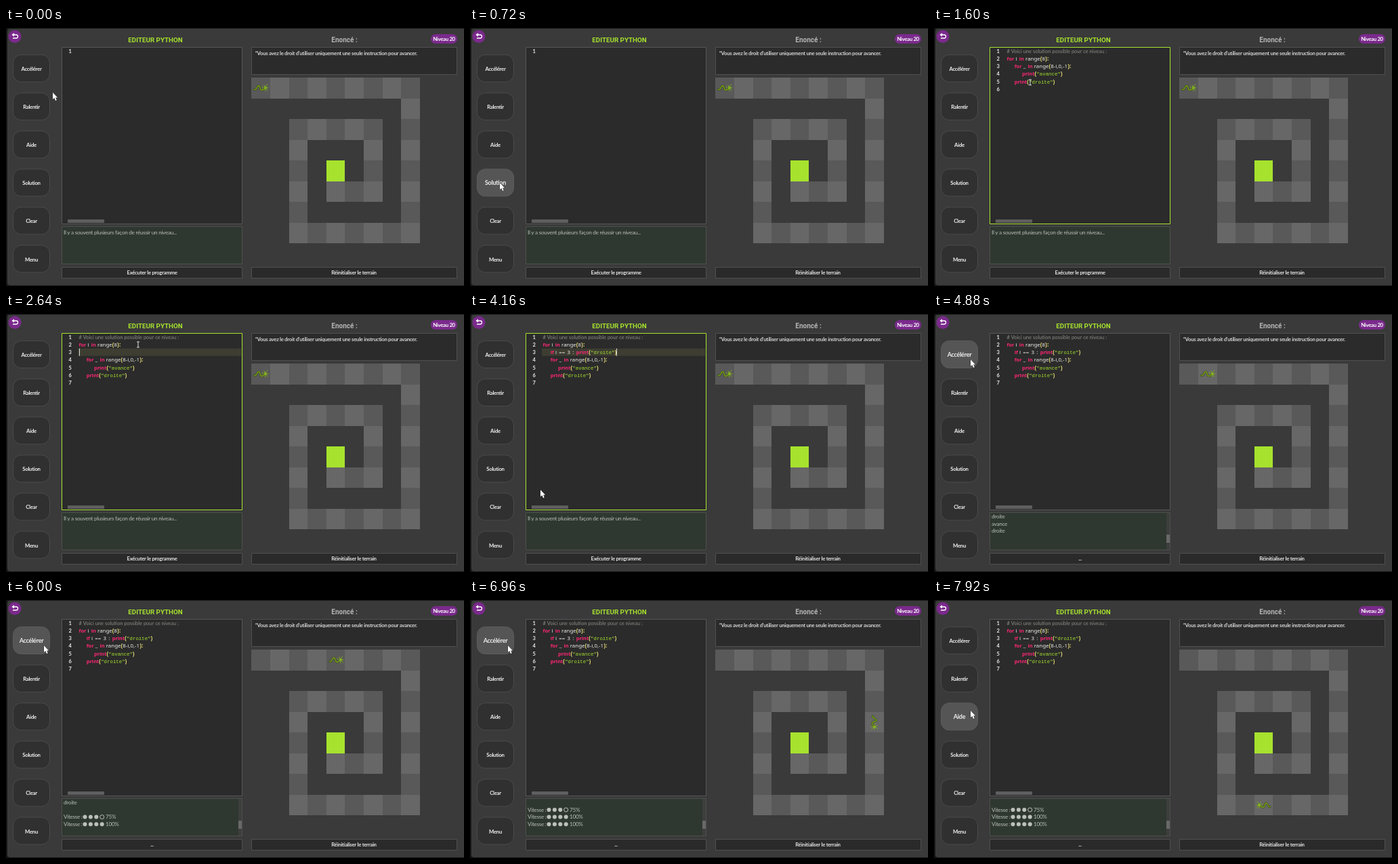
An HTML page with a canvas for the animation above (8 s loop, 676 by 380 pixels).

```html
<!DOCTYPE html>
<html lang="fr">
<meta charset="utf-8">
<title>Editeur Python</title>
<style>
html, body { margin: 0; height: 100%; overflow: hidden; background: #101010 }
canvas { display: block }
</style>
<canvas width="676" height="380"></canvas>
<script>
const ctx = document.querySelector('canvas').getContext('2d');
const LOOP = 8000, TICK = 80;
const GREEN = '#a6e22e', PURPLE = '#7a2a8c';
const UI = 'Lato, sans-serif', CODE = '"Noto Sans", sans-serif';

const STYLES = {
  comment: [`7.5px ${UI}`, '#8c8c86'],
  key: [`bold 7.5px ${CODE}`, '#f92672'],
  plain: [`7.9px ${CODE}`, '#eeeeea'],
  paren: [`bold 8.3px ${CODE}`, '#e6db74'],
  string: ['7.4px "Liberation Mono", monospace', GREEN],
};
const INDENT = 11.2;
const print = word => [['print', 'key'], ['(', 'paren'], [`"${word}"`, 'string'], [')', 'paren']];
const SOLUTION = [
  [0, [['# Voici une solution possible pour ce niveau :', 'comment']]],
  [0, [['for', 'key'], [' i ', 'plain'], ['in', 'key'], [' range', 'plain'], ['(', 'paren'], ['8', 'plain'], ['):', 'paren']]],
  [1, [['for', 'key'], [' _ ', 'plain'], ['in', 'key'], [' range', 'plain'], ['(', 'paren'], ['8-i,0,-1', 'plain'], ['):', 'paren']]],
  [2, print('avance')],
  [1, print('droite')],
  [0, []],
];
const TYPED = [['if', 'key'], [' i == 3 : ', 'plain'], ...print('droite')];
const OUTPUT = ['droite', 'avance', 'droite', '', 3, 4, 4];
const BUTTONS = ['Accélérer', 'Ralentir', 'Aide', 'Solution', 'Clear', 'Menu'];

// time, x, y, hovered button
const POINTER = [
  [0, 69, 95], [160, 69, 95], [560, 44, 228, 3], [1040, 44, 228], [1600, 142, 80],
  [1840, 142, 80], [2080, 195, 45], [3440, 195, 45], [3760, 125, 290], [4160, 104, 259],
  [4400, 150, 361], [4560, 150, 361], [4880, 54, 67, 0], [5200, 56, 67, 0],
  [7600, 56, 67, 0], [7760, 55, 84], [7840, 54, 115], [7920, 54, 163, 2], [8000, 54, 163, 2],
];

const cellX = c => Math.round(362.3 + c * 27.62);
const cellY = r => Math.round(73 + r * 30.56);

// walks along [dx, dy, steps] legs
const trail = [[0, 0]];
for (const [dx, dy, n] of [[1, 0, 8], [0, 1, 7], [-1, 0, 6], [0, -1, 5], [1, 0, 4], [0, 1, 3], [-1, 0, 2]])
  for (let i = 0; i < n; i++) {
    const [c, r] = trail.at(-1);
    trail.push([c + dx, r + dy]);
  }

function text(str, x, y, font, color, align = 'left') {
  ctx.font = font;
  ctx.fillStyle = color;
  ctx.textAlign = align;
  ctx.fillText(str, x, y);
  return ctx.measureText(str).width;
}

// tightly set interface text
function label(str, x, y, color, align = 'left', font = 'bold 7.8px') {
  ctx.letterSpacing = '-0.3px';
  text(str, x, y, `${font} ${UI}`, color, align);
  ctx.letterSpacing = '0px';
}

function box(x, y, w, h, fill, stroke, r = 0) {
  ctx.beginPath();
  ctx.roundRect(x, y, w, h, r);
  ctx.fillStyle = fill;
  ctx.fill();
  if (!stroke) return;
  ctx.strokeStyle = stroke;
  ctx.lineWidth = 1;
  ctx.stroke();
}

function disc(x, y, r, color, filled = true) {
  ctx.beginPath();
  ctx.arc(x, y, r, 0, 7);
  ctx.fillStyle = ctx.strokeStyle = color;
  ctx.lineWidth = 1;
  filled ? ctx.fill() : ctx.stroke();
}

function stroke(path, color, width) {
  ctx.strokeStyle = color;
  ctx.lineWidth = width;
  ctx.stroke(new Path2D(path));
}

function pointerAt(t) {
  const i = POINTER.findLastIndex(p => p[0] <= t);
  const [t0, x0, y0, hover] = POINTER[i], [t1, x1, y1] = POINTER[i + 1];
  const k = (t - t0) / (t1 - t0);
  return { x: x0 + (x1 - x0) * k, y: y0 + (y1 - y0) * k, hover };
}

function drawPointer({ x, y }) {
  ctx.save();
  ctx.translate(x, y);
  if (x > 105 && y < 106 && x < 348) {
    stroke('M-2-4H2M0-4V4M-2 4H2', '#ddd', 1);
  } else {
    const arrow = new Path2D('M0 0V10L2.4 8L4 12L5.8 11.2L4.2 7.4H7.2Z');
    ctx.strokeStyle = '#222';
    ctx.lineWidth = 1;
    ctx.stroke(arrow);
    ctx.fillStyle = '#fff';
    ctx.fill(arrow);
  }
  ctx.restore();
}

function drawRuns(runs, x, y, count = Infinity) {
  for (const [str, style] of runs) {
    const part = str.slice(0, Math.max(0, count));
    ctx.wordSpacing = style === 'plain' ? '1.2px' : '0px';
    x += text(part, x, y, ...STYLES[style]);
    count -= str.length;
  }
  ctx.wordSpacing = '0px';
  return x;
}

function drawEditor(t) {
  const focused = t >= 1040 && t < 4560;
  box(82.5, 28.5, 266, 260, '#2b2b2b', focused ? GREEN : '#565656');
  box(91, 282, 54, 5, '#5e5e5e');
  const lines = t < 1040 ? [[0, []]] : SOLUTION.slice();
  if (t >= 2400) lines.splice(2, 0, [t < 2800 ? 0 : 1, TYPED]);
  const count = Math.floor((t - 2840) / 36);
  const active = !focused || t < 2080 ? -1 : t < 2400 ? 1 : 2;
  lines.forEach(([indent, runs], i) => {
    const y = 37 + i * 11.15;
    if (i === active) box(106, y - 8.5, 241, 11, '#3e3d32');
    text(i + 1, 94.7, y, `bold 7.5px ${UI}`, '#eee', 'center');
    const end = drawRuns(runs, 107.5 + indent * INDENT, y, runs === TYPED ? count : Infinity);
    if (i === active) box(Math.round(end), y - 8.5, 1, 11, '#ddd');
  });
}

function drawConsole(t) {
  const line = (str, x, y) => label(str, x, y, '#b8bcb8', 'left', '8.2px');
  box(82.5, 292.5, 266, 55, '#2f3830', '#4c4f4c');
  if (t < 4560) {
    line('Il y a souvent plusieurs façon de réussir un niveau...', 85, 303.5);
    return;
  }
  box(343, 293, 5, 54, '#3d3f3d');
  box(343, 325, 5, 12, '#686868');
  const first = [5440, 5920, 6400].filter(click => t >= click).length;
  OUTPUT.slice(first, first + 4).forEach((entry, i) => {
    const y = 301 + i * 10.6;
    if (typeof entry === 'string') return line(entry, 85, y);
    line('Vitesse :', 85, y);
    for (let k = 0; k < 4; k++) disc(116.5 + k * 8.4, y - 2.6, 3, '#bcc0bc', k < entry);
    line(entry * 25 + '%', 147, y);
  });
}

function drawCell(c, r, color) {
  const x = cellX(c), y = cellY(r);
  box(x, y, cellX(c + 1) - x, cellY(r + 1) - y, color);
}

function drawMaze(t) {
  trail.forEach(([c, r]) => drawCell(c, r, (c + r) % 2 ? '#676767' : '#595959'));
  drawCell(4, 4, GREEN);

  // each corner costs one extra action
  const actions = t < 6160 ? [4800, 5200, 5520, 5840].filter(s => t >= s).length
    : 5 + Math.floor((t - 6160) / 110);
  const turns = (actions > 8) + (actions > 16);
  const [c, r] = trail[actions - turns];
  ctx.save();
  ctx.translate(cellX(c + .5), cellY(r + .5));
  if (turns === 1) ctx.rotate(Math.PI / 2);
  if (turns === 2) ctx.scale(-1, 1);
  ctx.lineCap = ctx.lineJoin = 'round';
  const body = 'M-9.5 2.5C-6 4.5-6-3-3-3S-2 4 2 3.5S4 0 8 0';
  stroke(body, '#35470f', 2.6);
  stroke(body, '#7da51e', 1.3);
  stroke('M4 1L2-2M6 1L7 5M7-2L10-5M8 0L11 0M7 1L10.5 4M6-1L5-4', '#7ea620', 1);
  disc(7, 0, 2, '#86b51f');
  ctx.restore();
}

function drawButtons(hover) {
  BUTTONS.forEach((name, i) => {
    const on = i === hover, y = 39.5 + i * 56.1;
    box(10.5, y, 54, 40, on ? '#555' : '#303030', on ? '#5c5c5c' : '#4a4a4a', 12);
    label(name, 37.5, y + 23.5, '#eee', 'center', `bold ${on ? 9.1 : 7.8}px`);
  });
}

function draw(t) {
  const pointer = pointerAt(t);
  box(0, 0, 676, 380, '#151515');
  box(2, 1, 676, 378, '#3a3a3a', null, 4);
  disc(13, 12.5, 9.5, PURPLE);
  stroke('M10 10H15A2.5 2.5 0 0 1 15 15H10M12 8L9.5 10L12 12', '#fff', 1.3);
  text('EDITEUR PYTHON', 220.5, 21, 'bold 9.8px Roboto, sans-serif', GREEN, 'center');
  text('Enoncé :', 499.5, 21, 'bold 10px Roboto, sans-serif', '#b4b4b4', 'center');
  box(627, 9, 39, 14, PURPLE, null, 7);
  label('Niveau 20', 646.5, 18.6, '#fff', 'center');
  box(362.5, 28.5, 303, 40, '#2b2b2b', '#505050');
  label("*Vous avez le droit d'utiliser uniquement une seule instruction pour avancer.", 367.5, 40, '#d4d4d4');
  drawButtons(pointer.hover);
  drawEditor(t);
  drawConsole(t);
  box(82.5, 352.5, 266, 16, '#2a2a2a', '#505050');
  label(t < 4560 ? 'Exécuter le programme' : '...', 215.5, 363.4, '#e4e4e4', 'center');
  box(362.5, 352.5, 303, 16, '#2a2a2a', '#505050');
  label('Réinitialiser le terrain', 513.5, 363.4, '#e4e4e4', 'center');
  drawMaze(t);
  drawPointer(pointer);
}

function frame() {
  draw(Math.floor(performance.now() % LOOP / TICK) * TICK);
  requestAnimationFrame(frame);
}
frame();
</script>
</html>
```
